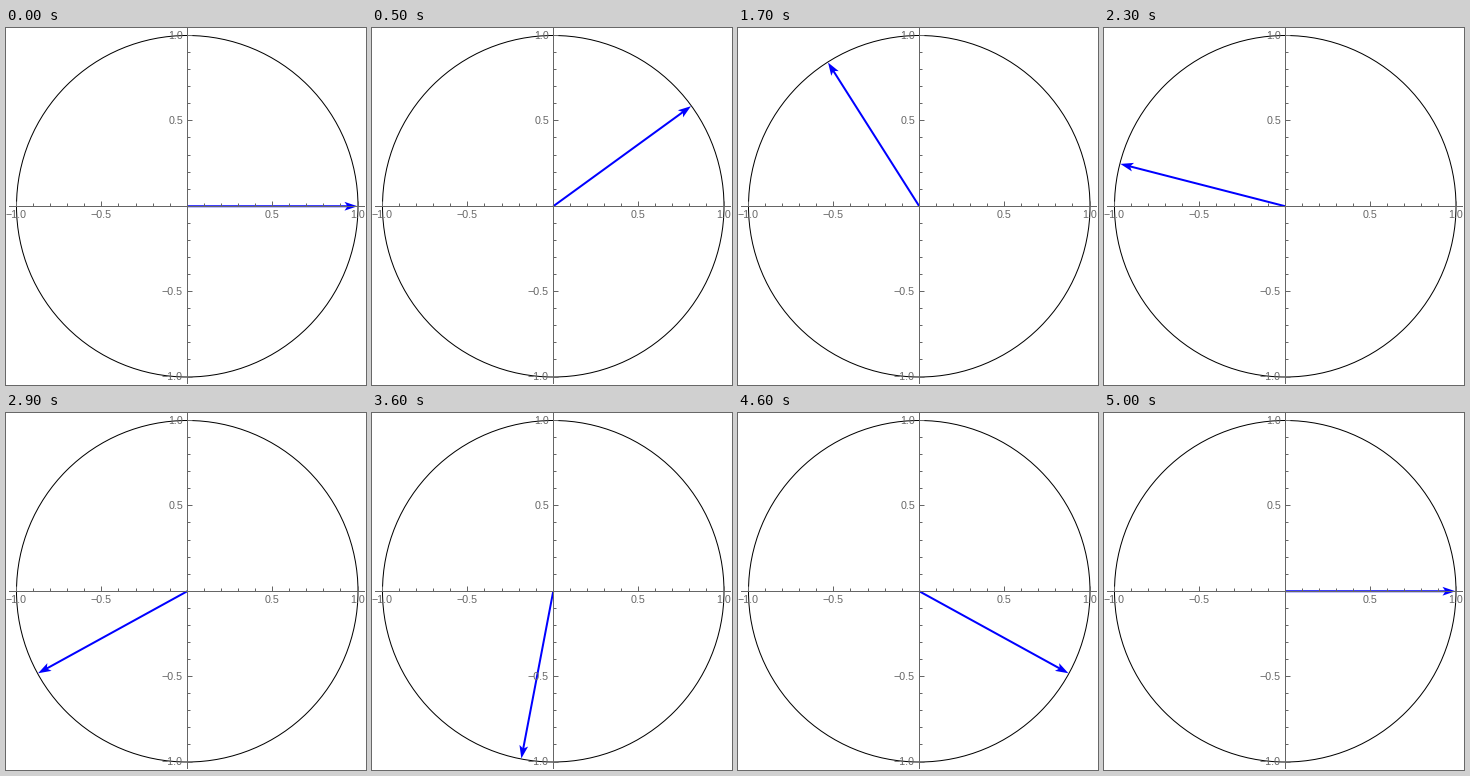
Animation of 360x357 px, one loop 5100 ms. Source, as a matplotlib script:

```python
import numpy as np
import matplotlib.pyplot as plt
from matplotlib.animation import FuncAnimation
from matplotlib.patches import Circle, Polygon

W, H, DPI = 360, 357, 100
PX = 72 / DPI  # one pixel in points
CX, CY, R = 181.25, 178.25, 170.75
REACH = 1.04 * R
FRAMES, STEPS = 51, 50
GRAY, BLUE = "#666666", "#0000ff"

fig = plt.figure(figsize=(W / DPI, H / DPI), dpi=DPI, facecolor="white")
ax = fig.add_axes([0, 0, 1, 1])
ax.set_xlim(0, W)
ax.set_ylim(H, 0)
ax.axis("off")


def line(xs, ys, color=GRAY, width=1, z=5):
    return ax.plot(xs, ys, color=color, lw=width * PX, zorder=z, snap=False,
                   solid_capstyle="butt")[0]


def label(x, y, value, align):
    text = f"{value:.1f}".replace("-", "\u2212")
    ax.text(x, y, text, color=GRAY, family="Liberation Sans",
            fontsize=10.6 * PX, ha=align, va="baseline", zorder=6)


def snap(v):
    """Centre of the pixel that holds v."""
    return np.floor(v) + 0.5


def draw_axes():
    ox, oy = snap(CX), snap(CY)
    line([snap(CX - REACH) - 0.5, snap(CX + REACH) + 0.5], [oy, oy])
    line([ox, ox], [snap(CY - REACH) - 0.5, snap(CY + REACH) + 0.5])
    for k in range(-10, 11):
        if k == 0:
            continue
        major = k % 5 == 0
        size = 5 if major else 3
        x, y = CX + k * R / 10, CY - k * R / 10
        line([snap(x)] * 2, [oy, oy - size])
        line([ox, ox + size], [snap(y)] * 2)
        if major:
            label(x - 0.5, 190, k / 10, "center")
            label(177, y + 3.2, k / 10, "right")


ax.add_patch(Circle((CX, CY), R, fill=False, ec="black", lw=PX, zorder=1))
draw_axes()

shaft = line([], [], BLUE, 2, 3)
# tip, barb, notch, barb, measured along and across the arrow
HEAD = np.array([[-0.5, 0], [-13.5, 4.4], [-10.5, 0], [-13.5, -4.4]])
head = ax.add_patch(Polygon(HEAD, closed=True, fc=BLUE, ec="none", zorder=4,
                            snap=False))


def update(i):
    angle = 2 * np.pi * i / STEPS
    along = np.array([np.cos(angle), -np.sin(angle)])
    across = np.array([-along[1], along[0]])
    center = np.array([CX, CY])
    end = center + along * (R - 10)
    shaft.set_data([CX, end[0]], [CY, end[1]])
    tip = center + along * R
    head.set_xy(tip + HEAD[:, :1] * along + HEAD[:, 1:] * across)
    return shaft, head


anim = FuncAnimation(fig, update, frames=FRAMES, interval=100,
                     repeat=True, repeat_delay=0)
plt.show()
```
